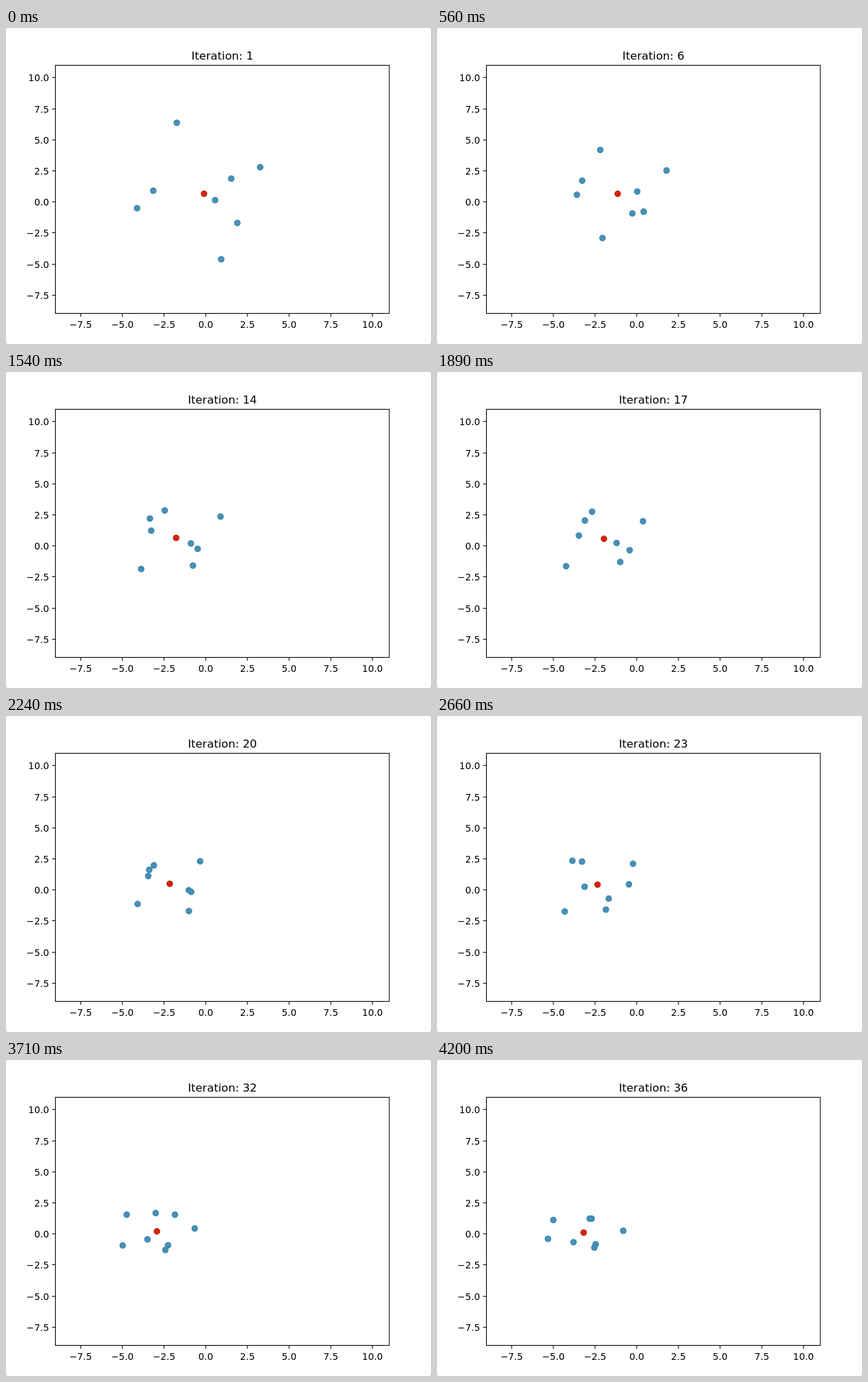
These frames come from a looping animation (632x470 px, 4270 ms). An HTML page with a canvas:

```html
<!DOCTYPE html>
<html lang="en">
<head>
<meta charset="utf-8">
<title>Iterations</title>
<style>
  html, body { margin: 0; width: 100%; height: 100%; overflow: hidden; background: #fff; }
  canvas { display: block; }
</style>
</head>
<body>
<canvas id="stage" width="632" height="470"></canvas>
<script>
const ctx = document.getElementById('stage').getContext('2d');
const TICK = 70, LOOP = 61 * TICK;
const TICKS_PER_ITERATION = 1.73, LEAD = 2.7;
const MIDDLE = 14, LAST = 36;
const AXES = { left: 73.5, top: 55.5, right: 570, bottom: 424.5 };

// Where each particle starts, settles and ends.
const particles = [
  [254, 141, 236, 206, 173, 238],
  [378, 207, 319, 215, 230, 236],
  [335, 224, 275, 255, 236, 274],
  [219, 242, 214, 218, 227, 236],
  [195, 268, 216, 236, 203, 271],
  [311, 256, 278, 288, 234, 279],
  [344, 290, 285, 263, 277, 254],
  [320, 344, 201, 293, 165, 266]
];

function iterationAt(ms) {
  return Math.floor((Math.floor(ms / TICK) + LEAD) / TICKS_PER_ITERATION);
}

// A quick contraction, then a slow drift with some wandering.
// The wander phases are evenly spread, so it leaves the mean in place.
function locate([x0, y0, x1, y1, x2, y2], index, n) {
  const settle = Math.max(0, (MIDDLE - n) / (MIDDLE - 1)) ** 2;
  const drift = Math.max(0, (n - MIDDLE) / (LAST - MIDDLE));
  const wander = 10 * Math.sin(Math.PI * drift);
  const phase = n * 0.7 + index * Math.PI * 0.75;
  return {
    x: x1 + (x0 - x1) * settle + (x2 - x1) * drift + wander * Math.cos(phase),
    y: y1 + (y0 - y1) * settle + (y2 - y1) * drift + wander * Math.sin(phase)
  };
}

function text(label, x, y, size, align) {
  ctx.font = `${size}px "DejaVu Sans", sans-serif`;
  ctx.textAlign = align;
  ctx.fillText(label, x, y);
}

function line(x1, y1, x2, y2) {
  ctx.beginPath();
  ctx.moveTo(x1, y1);
  ctx.lineTo(x2, y2);
  ctx.stroke();
}

function dot({ x, y }, fill, edge) {
  ctx.beginPath();
  ctx.arc(x, y, 4.2, 0, Math.PI * 2);
  ctx.fillStyle = fill;
  ctx.fill();
  ctx.strokeStyle = edge;
  ctx.lineWidth = 1.3;
  ctx.stroke();
}

function drawAxes() {
  const { left, top, right, bottom } = AXES;
  ctx.strokeStyle = ctx.fillStyle = '#000';
  ctx.lineWidth = 1.1;
  ctx.strokeRect(left, top, right - left, bottom - top);
  for (let v = -7.5; v <= 10; v += 2.5) {
    const label = v.toFixed(1).replace('-', '\u2212');
    const x = 297 + v * 24.8;
    const y = Math.floor(258.6 - v * 18.48) + 0.5;
    line(x, bottom, x, bottom + 4.9);
    line(left, y, left - 4.9, y);
    text(label, x, 445.6, 13.89, 'center');
    text(label, left - 9.5, y + 5.1, 13.89, 'right');
  }
}

function drawCorners() {
  ctx.fillStyle = '#888';
  for (const x of [0, 631]) for (const y of [0, 469]) ctx.fillRect(x, y, 1, 1);
}

function draw(now) {
  const n = iterationAt(now % LOOP);
  const points = particles.map((keys, i) => locate(keys, i, n));
  const mean = key => points.reduce((sum, p) => sum + p[key], 0) / points.length;

  ctx.fillStyle = '#fff';
  ctx.fillRect(0, 0, 632, 470);
  drawCorners();
  drawAxes();
  text('Iteration: ' + n, 321.8, 47.2, 16.67, 'center');
  points.forEach(p => dot(p, '#4691b7', '#3c84ab'));
  dot({ x: mean('x'), y: mean('y') }, '#dd2200', '#b02a14');
  requestAnimationFrame(draw);
}

requestAnimationFrame(draw);
</script>
</body>
</html>
```
